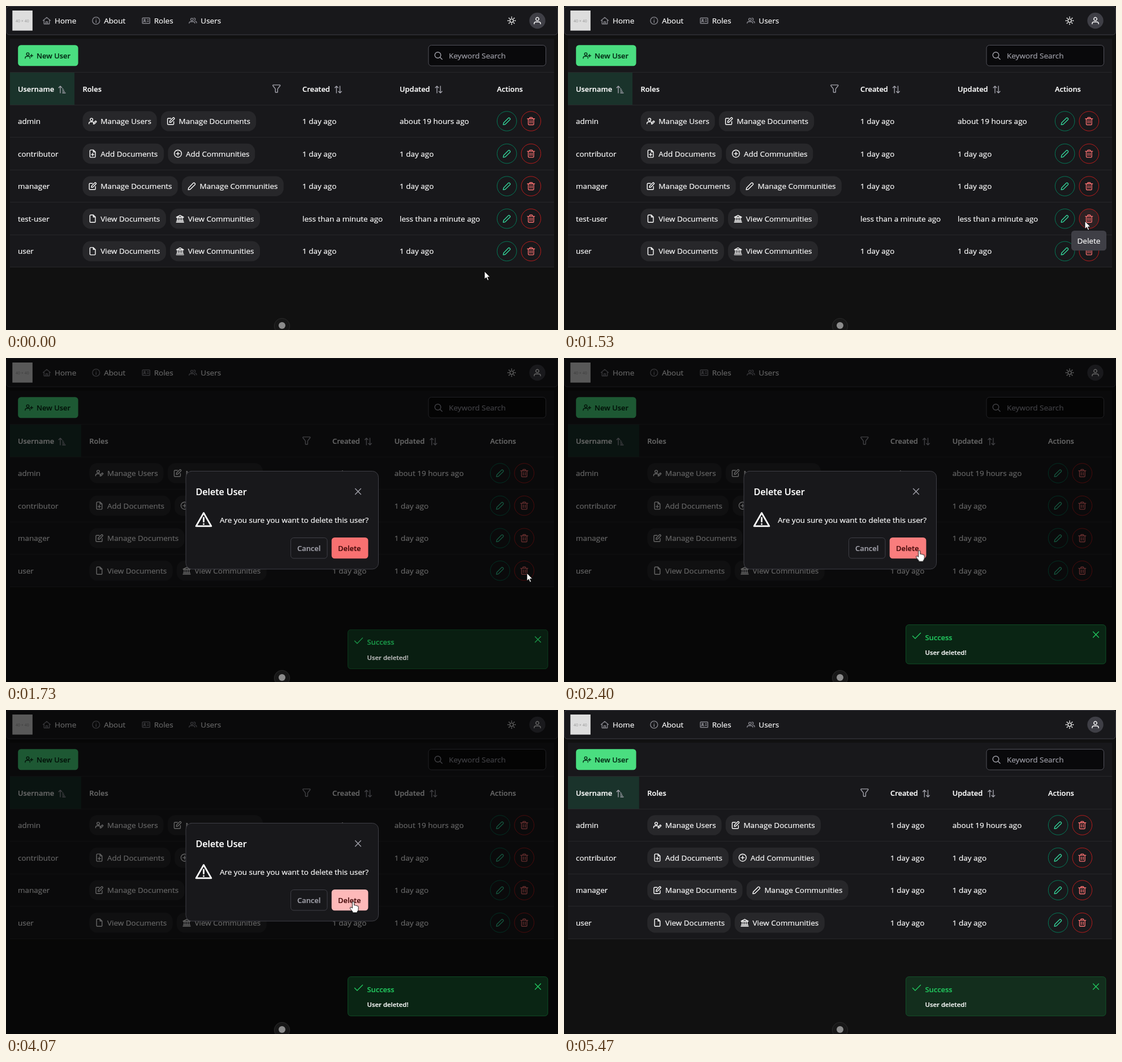
Write an HTML page that moves like this. It is 976 by 574 pixels and loops after 5.74 s.

```html
<!DOCTYPE html>
<html lang="en">
<head>
<meta charset="utf-8">
<title>User administration</title>
<style>
html, body { margin: 0; width: 100%; height: 100%; overflow: hidden; background: #111; }
svg { display: block; width: 976px; height: 574px; }
text {
  font: 13.5px "Open Sans", "Noto Sans", sans-serif;
  color: #fff; fill: currentColor; stroke: currentColor; stroke-width: .2px;
  white-space: pre;
}
.b { font-size: 12.9px; font-weight: 600; }
.title { font-size: 16px; font-weight: 600; }
.small { font-size: 11.4px; font-weight: 600; }
.tiny { font-size: 7px; color: #969696; stroke: none; }
.muted { color: #a1a1aa; }
.onGreen { color: #052e16; }
.onRed { color: #450a0a; }
.green { color: #22c55e; }
.icon { fill: none; stroke-width: 1.4; stroke-linecap: round; stroke-linejoin: round; }

/* one loop is 5740 ms */
.before, .after, .hover, .tip, .mask, .dialog, .confirm, .toast, .cursor, .arrow, .hand {
  animation: 5740ms linear infinite;
}
.before { animation-name: before; }
.after { animation-name: after; }
.hover { animation-name: hover; }
.tip { animation-name: tip; }
.mask { animation-name: mask; }
.dialog { animation-name: dialog; transform-origin: 488.5px 287px; }
.confirm { animation-name: confirm; }
.toast { animation-name: toast; }
.cursor { animation-name: cursor; }
.arrow { animation-name: arrow; }
.hand { animation-name: hand; }

@keyframes before {
  0%, 27.8% { visibility: visible; }
  27.81%, 100% { visibility: hidden; }
}
@keyframes after {
  0%, 27.8% { visibility: hidden; }
  27.81%, 100% { visibility: visible; }
}
@keyframes hover {
  0%, 7.4% { fill-opacity: 0; }
  9.5%, 25.4% { fill-opacity: .05; }
  28.5%, 100% { fill-opacity: .16; }
}
@keyframes tip {
  0%, 7.9% { opacity: 0; }
  11.6%, 27.8% { opacity: 1; }
  27.81%, 100% { opacity: 0; }
}
@keyframes mask {
  0%, 27% { opacity: 0; }
  29.6%, 71.3% { opacity: .6; }
  73.4%, 100% { opacity: 0; }
}
@keyframes dialog {
  0%, 27.1% { opacity: 0; transform: scale(.7); animation-timing-function: cubic-bezier(0, 0, .2, 1); }
  29.7% { opacity: 1; transform: none; }
  72.04% { opacity: 1; transform: none; animation-timing-function: cubic-bezier(.4, 0, .2, 1); }
  74.65%, 100% { opacity: 0; transform: scale(.7); }
}
@keyframes confirm {
  0%, 41% { fill: #f87171; }
  44.5%, 70.6% { fill: #fca5a5; }
  71.2%, 100% { fill: #fecaca; }
}
@keyframes toast {
  0%, 27.79% { opacity: 0; transform: translateY(35px); animation-timing-function: ease; }
  33.01%, 100% { opacity: 1; transform: none; }
}
@keyframes cursor {
  0% { transform: translate(846px, 470px); }
  .5% { transform: translate(846px, 470px); animation-timing-function: ease-in-out; }
  9.2% { transform: translate(921px, 381px); }
  33.62% { transform: translate(921px, 381px); animation-timing-function: ease-in-out; }
  42.5% { transform: translate(625px, 341px); animation-timing-function: ease-out; }
  45.3%, 53.3% { transform: translate(616px, 340px); }
  53.48% { transform: translate(614px, 340px); }
  77.4% { transform: translate(614px, 340px); animation-timing-function: cubic-bezier(.4, .1, .8, .8); }
  82.6% { transform: translate(378px, 539px); }
  83.5%, 100% { transform: translate(330px, 580px); }
}
@keyframes arrow {
  0%, 41% { opacity: 1; }
  41.01%, 77.6% { opacity: 0; }
  77.61%, 83.3% { opacity: 1; }
  83.31%, 100% { opacity: 0; }
}
@keyframes hand {
  0%, 41% { opacity: 0; }
  41.01%, 77.6% { opacity: 1; }
  77.61%, 100% { opacity: 0; }
}
</style>
</head>
<body>
<svg id="stage" viewBox="0 0 976 574"></svg>
<script>
const ring = (x, y, r) => `M${x - r} ${y}a${r} ${r} 0 1 0 ${2 * r} 0a${r} ${r} 0 1 0 ${-2 * r} 0`;
const rays = Array.from({ length: 8 }, (_, i) => {
  const c = Math.cos(i * Math.PI / 4), s = Math.sin(i * Math.PI / 4);
  return `M${5.3 * c} ${5.3 * s}L${6.8 * c} ${6.8 * s}`;
}).join('');
const page = 'M1.2-6.5H-3.5q-1.3 0-1.3 1.3V5.2q0 1.3 1.3 1.3H3.5q1.3 0 1.3-1.3V-3ZM1.2-6.3V-3H4.6';
const bust = ring(-2, -2.8, 2.3) + 'M-6.5 4.8V4q0-2.7 2.7-2.7H-.4q2 0 2.6 1.5';

// Icons are drawn around 0,0 in a 14 px box.
const shapes = {
  home: 'M-6.5-.2L0-5.8L6.5-.2M-4.7-1.5V5.8H4.7V-1.5M-1.5 5.8V2H1.5V5.8',
  info: ring(0, 0, 6.4) + 'M0-.6V3.2M0-3.1v.2',
  card: 'M-5.7-4.8H5.7q.9 0 .9.9V3.9q0 .9-.9.9H-5.7q-.9 0-.9-.9V-3.9q0-.9.9-.9Z' +
    ring(-2.6, -1.3, 1.2) + 'M-4.6 2.4q0-1.4 2-1.4t2 1.4M2-1.6H4.4M2 1.3H4.4',
  users: ring(-1.5, -2.2, 2.2) + 'M-6.5 4.6q0-2.9 2.8-2.9H.8q2.7 0 2.7 2.9M2-4.6q2.3-.3 2.4 1.9q0 1.8-1.6 2.2M4.6 1q2.1.4 2.1 2.9',
  user: ring(0, -2.9, 2.8) + 'M-5.6 5.7V5q0-2.8 2.8-2.8H2.8q2.8 0 2.8 2.8v.7',
  userPlus: bust + 'M1.8 4.8V4M4.7-2.3V2.3M2.4 0H7',
  userEdit: bust + 'M1.3 5l.3-1.8L5.3-.5l1.5 1.5L3.1 4.7Z',
  sun: ring(0, 0, 3.1) + rays,
  search: ring(-1, -1, 5.3) + 'M3 3L6.6 6.6',
  filter: 'M-5.8-6.6H5.8Q7-6.2 6.2-5L2 .4V5.7q0 .8-.8.8H-1.2q-.8 0-.8-.8V.4L-6.2-5Q-7-6.2-5.8-6.6Z',
  sort: 'M-3-6V6M-5.8-3.2L-3-6L-.2-3.2M3.2-6V6M.4 3.2L3.2 6L6 3.2',
  sortUp: 'M-3-6V6M-5.8-3.2L-3-6L-.2-3.2M1-1.2H1.8M1 1.2H3.2M1 3.6H4.5M1 6H6',
  edit: 'M-.2-5H-4.7q-1.3 0-1.3 1.3V4.7q0 1.3 1.3 1.3H3.7q1.3 0 1.3-1.3V.6M-2.2 2.2l.4-2.6L4-6.2q.6-.5 1.2 0l.9.9q.5.6 0 1.2L.4 1.8Z',
  pencil: 'M-6.4 6.4l.6-3.4L2.7-5.6q1-.9 2 0l.9.9q.9 1 0 2L-3 5.8Z',
  file: page,
  fileAdd: page + 'M0-.9V3.9M-2.4 1.5H2.4',
  plus: ring(0, 0, 6.4) + 'M0-3V3M-3 0H3',
  bank: 'M-6.3-2.6L0-6L6.3-2.6ZM-4.5-2.4V3.9M-1.5-2.4V3.9M1.5-2.4V3.9M4.5-2.4V3.9M-5.8 4H5.8M-6.5 6.2H6.5',
  trash: 'M-6.4-4.2H6.4M-2.5-4.2V-5.7q0-.8.8-.8H1.7q.8 0 .8.8V-4.2M-4.8-4.2V5.2q0 1.3 1.3 1.3H3.5q1.3 0 1.3-1.3V-4.2M-1.7-1.3V3.5M1.7-1.3V3.5',
  close: 'M-4.9-4.9L4.9 4.9M4.9-4.9L-4.9 4.9',
  check: 'M-7 .5L-2.6 5L7-4.8',
  warn: 'M0-6L6.7 5.7H-6.7ZM0-1.8V1.8M0 3.8v.1'
};

const icon = (name, x, y, color = '#fff', size = 1) =>
  `<path class="icon" d="${shapes[name]}" stroke="${color}" transform="translate(${x} ${y}) scale(${size})"/>`;
const text = (x, y, str, cls = '') => `<text x="${x}" y="${y}" class="${cls}">${str}</text>`;
const box = (x, y, w, h, fill, r = 0, more = '') =>
  `<rect x="${x}" y="${y}" width="${w}" height="${h}" rx="${r}" fill="${fill}" ${more}/>`;
const edge = color => `stroke="${color}"`;
const disc = (x, y, r, fill, more = '') => `<circle cx="${x}" cy="${y}" r="${r}" fill="${fill}" ${more}/>`;

// label: [icon, chip width]
const roles = {
  'Manage Users': ['userEdit', 131.3],
  'Manage Documents': ['edit', 168.3],
  'Add Documents': ['fileAdd', 143.7],
  'Add Communities': ['plus', 154],
  'Manage Communities': ['pencil', 180],
  'View Documents': ['file', 147.4],
  'View Communities': ['bank', 159]
};
const day = '1 day ago', now = 'less than a minute ago';
const people = [
  ['admin', 'Manage Users', 'Manage Documents', day, 'about 19 hours ago'],
  ['contributor', 'Add Documents', 'Add Communities', day, day],
  ['manager', 'Manage Documents', 'Manage Communities', day, day],
  ['test-user', 'View Documents', 'View Communities', now, now],
  ['user', 'View Documents', 'View Communities', day, day]
];

function chip(x, y, label) {
  const [name, w] = roles[label];
  return box(x, y - 17.8, w, 35.6, '#27272a', 14.2) + icon(name, x + 17.7, y) + text(x + 31.7, y + 5, label);
}

function row([name, first, second, made, changed], i, col) {
  const y = 204 + 57.6 * i;
  const edit = col.actions + 17.6, del = edit + 42.7;
  const hover = name === 'test-user' ? disc(del, y, 17.3, '#f87171', 'class="hover"') : '';
  return text(21, y + 5, name) +
    chip(col.roles, y, first) + chip(col.roles + roles[first][1] + 7.1, y, second) +
    text(col.made, y + 5, made) + text(col.changed, y + 5, changed) + hover +
    disc(edit, y, 17.3, 'none', edge('#047857')) + icon('pencil', edit, y, '#34d399') +
    disc(del, y, 17.3, 'none', edge('#b91c1c')) + icon('trash', del, y, '#f87171') +
    box(7, Math.round(y + 28), 962, 1, '#27272a');
}

function table(list, col, cls) {
  const grey = '#a1a1aa';
  return `<g class="${cls}">` +
    box(7, 58, 962, 117 + 57.6 * list.length, '#18181b') +
    box(7, 117, 962, 1, '#27272a') +
    box(7, 118, col.roles - 21.5, 57, '#1a332b') +
    box(7, 175, 962, 1, '#27272a') +
    text(21, 151.5, 'Username', 'b') + icon('sortUp', 99, 148, grey) +
    text(col.roles, 151.5, 'Roles', 'b') + icon('filter', col.filter, 146.5, grey) +
    text(col.made, 151.5, 'Created', 'b') + icon('sort', col.made + 63.3, 148, grey) +
    text(col.changed, 151.5, 'Updated', 'b') + icon('sort', col.changed + 69, 148, grey) +
    text(col.actions, 151.5, 'Actions', 'b') +
    list.map((p, i) => row(p, i, col)).join('') + '</g>';
}

const link = (name, x, label) => icon(name, x, 26, '#85858c') + text(x + 14, 31, label);

const nav =
  box(.5, .5, 975, 50.5, '#18181b', 5.3, edge('#3f3f46')) +
  box(11.3, 8, 35.6, 35.6, '#ddd') + text(17, 28.5, '40 × 40', 'tiny') +
  link('home', 72, 'Home') + link('info', 159.3, 'About') +
  link('card', 247.7, 'Roles') + link('users', 330.3, 'Users') +
  icon('sun', 894, 26) + disc(939.5, 26, 14.2, '#3f3f46') + icon('user', 939.5, 26);

const tools =
  box(21.2, 69.2, 106.4, 37, '#4ade80', 5.3) + icon('userPlus', 40.5, 88, '#052e16') +
  text(54, 93, 'New User', 'b onGreen') +
  box(747, 69.5, 207.5, 36.5, '#09090b', 5.3, edge('#52525b')) +
  icon('search', 764.5, 88, '#a1a1aa') + text(783, 93, 'Keyword Search', 'muted');

const tip = '<g class="tip">' + box(897, 398, 62, 35.3, '#3f3f46', 5.3) + text(907.5, 420.5, 'Delete') + '</g>';

const dialog = '<g class="dialog">' +
  box(318, 200.5, 340.5, 173.5, '#18181b', 10.7, edge('#3f3f46')) +
  text(335.5, 243, 'Delete User', 'title') + icon('close', 622.5, 236.5, '#a1a1aa') +
  icon('warn', 349.5, 286.5, '#fff', 2) +
  text(378, 291.5, 'Are you sure you want to delete this user?') +
  box(503.5, 318.5, 64.5, 36.5, 'none', 5.3, edge('#3f3f46')) + text(515, 342, 'Cancel', 'b muted') +
  box(575.7, 318, 64.7, 37.3, '#f87171', 5.3, 'class="confirm"') + text(587, 342, 'Delete', 'b onRed') + '</g>';

const toast = '<g class="toast">' +
  box(604.5, 472.5, 353.5, 69.5, '#22c55e', 5.3, 'fill-opacity=".16" stroke="#15803d" stroke-opacity=".5"') +
  icon('check', 623.5, 492, '#22c55e') + text(638.5, 499.5, 'Success', 'b green') +
  text(638.5, 526, 'User deleted!', 'small') + icon('close', 940.5, 490, '#22c55e') + '</g>';

const badge = disc(488, 567, 13.7, '#171717', edge('#2b2b2b')) + disc(488, 566, 6, '#8c8c8c');

const cursor = '<g class="cursor" fill="#fff" stroke="#000" stroke-width=".9" stroke-linejoin="round">' +
  '<path class="arrow" d="M0 0V14L3.2 11L5.5 16.3L7.7 15.3L5.5 10.2H9.8Z"/>' +
  '<path class="hand" d="M-1.7 11V1.2Q-1.6-.4 0-.4T1.6 1.2V6q1.9-.9 2.8.5q1.8-.7 2.5.7q2.2-.5 2.2 1.6v4q0 3-2 4.3V19H-1.2V17.2Q-3.6 14.8-5.6 11.4Q-6 9.4-4.2 9.3Q-3 9.6-1.7 11Z"/></g>';

document.getElementById('stage').innerHTML =
  box(0, 0, 976, 574, '#111') + nav +
  table(people, { roles: 135.5, filter: 478.3, made: 524, changed: 696, actions: 868 }, 'before') +
  table(people.filter(p => p[0] !== 'test-user'),
    { roles: 147.3, filter: 531.4, made: 577, changed: 686.7, actions: 856 }, 'after') +
  tools + tip + box(0, 0, 976, 574, '#000', 0, 'class="mask"') + dialog + toast + badge + cursor;
</script>
</body>
</html>
```
